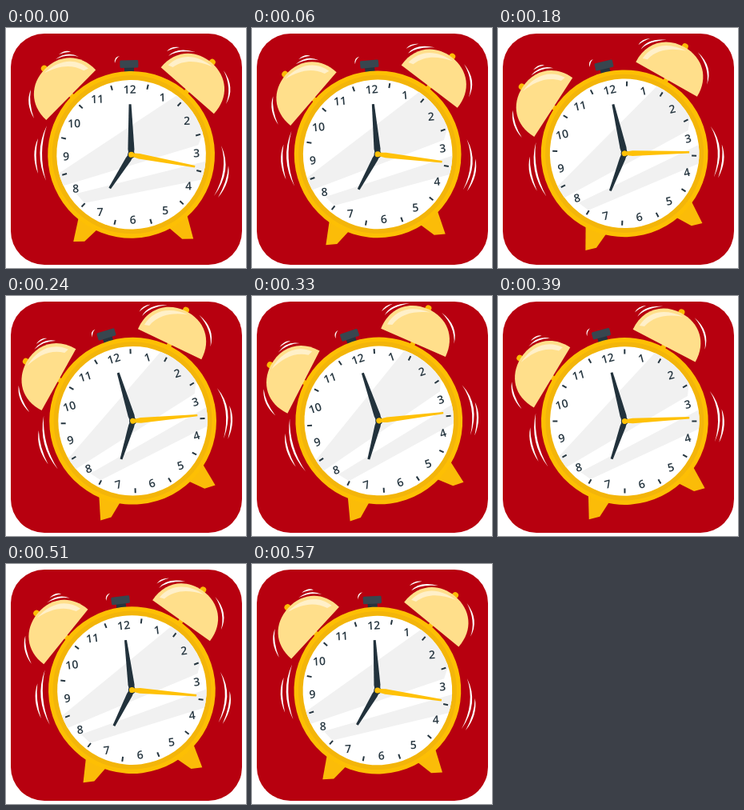
These frames come from a looping animation (300x300 px, 0.6 s). An HTML page:

```html
<!DOCTYPE html>
<html lang="en">
<head>
<meta charset="utf-8">
<title>Ringing alarm clock</title>
<style>
  html, body { margin: 0; width: 100%; height: 100%; overflow: hidden; background: #fff; }
  svg { display: block; width: 100vw; height: 100vh; }
  text { font: 600 14px "Open Sans", "Noto Sans", sans-serif; fill: #263640; text-anchor: middle; }
</style>
</head>
<body>
<svg viewBox="0 0 300 300">
  <defs>
    <clipPath id="glass"><circle r="93.3"/></clipPath>
    <!-- Bell standing on its rim, centred on the origin -->
    <g id="bell">
      <path d="M-3 -2H3V8H-3Z" fill="#fbbc05"/>
      <circle cy="-47" r="4" fill="#fbbc05"/>
      <path d="M-44 0C-45 -28 -26 -46 0 -46S45 -28 44 0Z" fill="#ffdf8b"/>
    </g>
    <path id="gloss" d="M-39 -8C-37 -30 -20 -42 4 -43C-14 -37 -28 -28 -33 -10Z" fill="#fff0c9"/>
  </defs>
  <rect x="6" y="7" width="289" height="289" rx="42" fill="#b7000f"/>
  <g id="clock">
    <path id="shake" fill="#fff"/>
    <g transform="translate(156.6 158.3) rotate(-1.4)">
      <g fill="#fbbc08">
        <path d="M-68 78L-75 107H-61L-42 90Z"/>
        <path d="M68 78L75 107H61L42 90Z"/>
      </g>
      <g transform="rotate(-43.9) translate(0 -106)">
        <use href="#bell"/>
        <use href="#gloss" transform="scale(-1 1)"/>
      </g>
      <g transform="rotate(42.6) translate(0 -106.5)">
        <use href="#bell"/>
        <use href="#gloss"/>
      </g>
      <path d="M-6 -112H6V-102H-6Z" fill="#26343d"/>
      <rect x="-11.5" y="-118" width="23" height="9.5" rx="1.5" fill="#38464f"/>
      <circle r="104.4" fill="#fdbf04"/>
      <circle r="99" fill="#f3b50a"/>
      <circle r="93.3" fill="#fff"/>
      <g clip-path="url(#glass)" fill="#f1f1f1">
        <path d="M59 -73L-94 23L-90 38L84 -10L100 -50Z"/>
        <path d="M95 10L-70 47L-60 59L95 32Z"/>
      </g>
      <g id="dial"></g>
      <g fill="#22323c">
        <path d="M-1.5 -63H1.5L4 -7L3 2H-3L-4 -7Z"/>
        <path d="M-1.5 -50H1.5L3.6 -7L3 2H-3L-3.6 -7Z" transform="rotate(-146)"/>
        <circle r="4.6"/>
      </g>
      <path d="M-1.2 -81H1.2L3.3 -10L2 0H-2L-3.3 -10Z" fill="#ffc107" transform="rotate(102)"/>
      <circle r="3.5" fill="#ffc107"/>
    </g>
  </g>
</svg>
<script>
  const LOOP = 600, STEP = 30, SWING = 19.5;
  const $ = id => document.getElementById(id);

  // Motion marks: start, bulge, end
  const marks = [
    [51, 122, 37, 156, 50, 191], [40, 138, 33, 158, 40, 182],
    [66, 33, 75, 28, 81, 30], [62, 39, 77, 30, 91, 36],
    [31, 77, 26, 94, 35, 113], [136, 44, 136, 37, 142, 35],
    [203, 35, 214, 25, 237, 30], [201, 29, 207, 24, 217, 24],
    [272, 53, 285, 75, 275, 95],
    [269, 147, 281, 178, 260, 210], [278, 172, 279, 192, 265, 212]
  ];

  // Crescent, thickest in the middle and pointed at both ends
  function crescent([x0, y0, cx, cy, x1, y1]) {
    const len = Math.hypot(x1 - x0, y1 - y0), w = Math.min(2.6, 1.2 + len / 40);
    const dx = (y1 - y0) / len * w, dy = (x0 - x1) / len * w;
    return `M${x0} ${y0}Q${cx + dx} ${cy + dy} ${x1} ${y1}Q${cx - dx} ${cy - dy} ${x0} ${y0}Z`;
  }
  $("shake").setAttribute("d", marks.map(crescent).join(""));

  let dial = "";
  for (let h = 1; h <= 12; h++) {
    const a = h * Math.PI / 6;
    const x = 81.5 * Math.sin(a), y = 5 - 81.5 * Math.cos(a);
    dial += `<text x="${x}" y="${y}">${h}</text>
      <path d="M0 -84V-90" stroke="#263640" stroke-width="2" transform="rotate(${h * 30 - 15})"/>`;
  }
  $("dial").innerHTML = dial;

  // Constant-speed swing there and back, held on each step
  const start = performance.now();
  function draw() {
    const t = Math.floor((performance.now() - start) % LOOP / STEP) * STEP;
    const swing = 1 - Math.abs(1 - 2 * t / LOOP);
    $("clock").setAttribute("transform", `rotate(${-SWING * swing} 150 150)`);
    requestAnimationFrame(draw);
  }
  draw();
</script>
</body>
</html>
```
